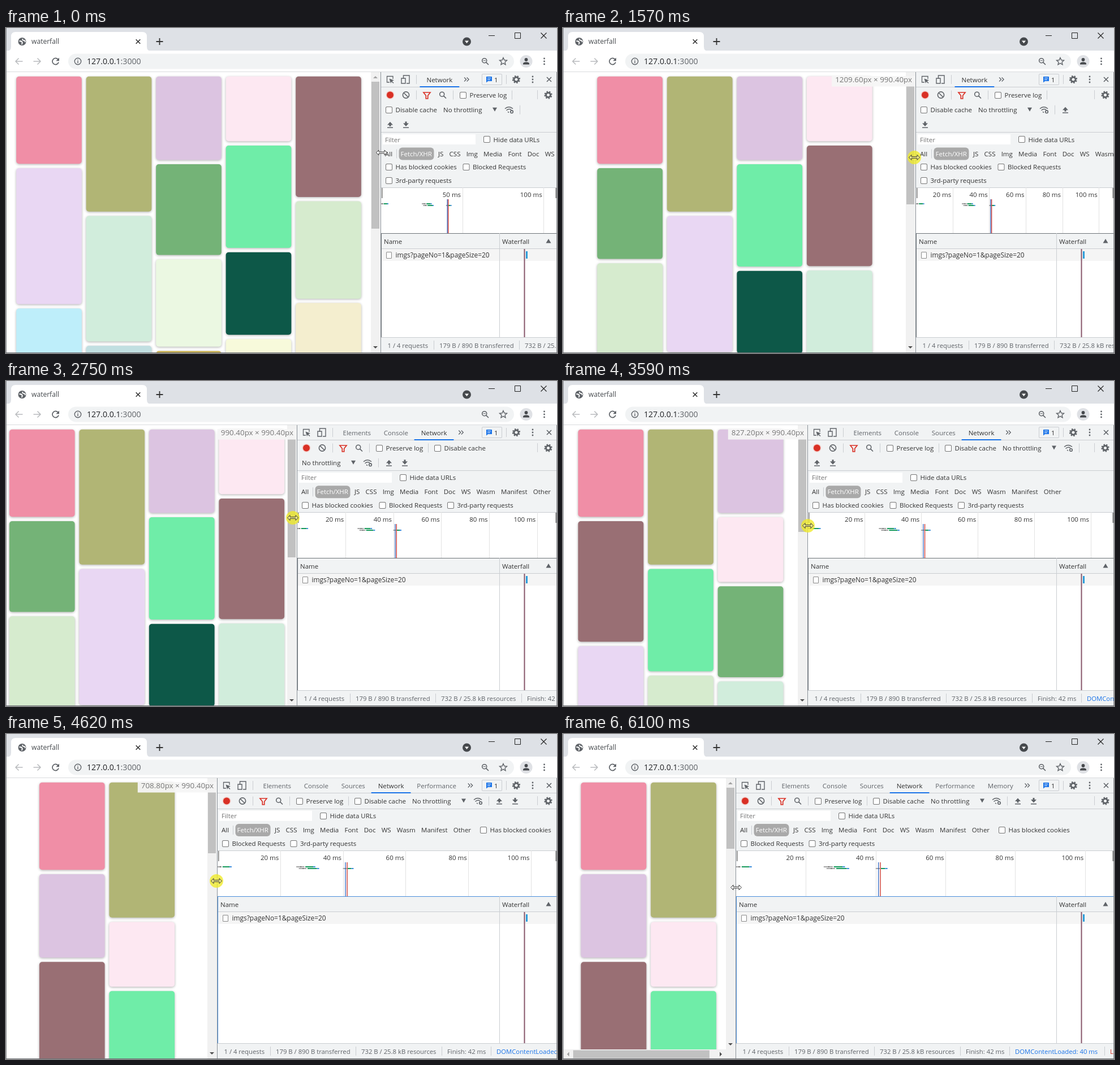
Write an HTML page with a canvas that moves like this. It is 974 px wide and 575 px high and loops after 6330 ms.

```html
<!DOCTYPE html>
<html lang="en">
<head>
<meta charset="utf-8">
<title>waterfall</title>
<style>
html, body { margin: 0; width: 100%; height: 100%; overflow: hidden; background: #fff; }
canvas { display: block; }
</style>
</head>
<body>
<canvas id="stage" width="974" height="575"></canvas>
<script>
const c = document.getElementById('stage').getContext('2d');
const W = 974, H = 575, LOOP = 6330, TICK = 78.4, DRAG_START = 923;
const INK = '#333', GREY = '#5f6368', PANEL = '#f1f3f4', RULE = '#cacdd1', BLUE = '#1a73e8', RED = '#d93025';

// [tick, splitter x, pointer offset, pointer y]
const DRAG = [
  [-1, 663, 1, 220.5], [0, 659, 0, 221], [3, 641, -1, 227], [7, 630, -2, 228], [8, 624, -3, 229],
  [13, 594, -4, 231], [17, 543, -3, 235], [18, 543, -3, 235], [23, 515, -8, 242], [24, 503, -6, 244],
  [27, 480, -3, 247], [28, 480, -3, 247], [34, 433, 0, 256], [37, 411, -1, 257], [45, 380, -2, 259],
  [47, 374, -2, 260], [54, 306, 0, 271.5]
];

const CARDS = [
  ['#f08ea6', 154.6], ['#b1b575', 239.1], ['#dcc4e1', 147.6], ['#fde8f2', 114.6], ['#996f74', 213.2],
  ['#6feda8', 181.1], ['#74b377', 160.6], ['#e9d7f3', 240.6], ['#d6ebce', 172.3], ['#d1eddc', 222],
  ['#0d5848', 146], ['#ebf8e2', 154.5], ['#f4eecf', 200], ['#beeefa', 200], ['#f7fadb', 200],
  ['#c1dfe1', 200], ['#c9b04f', 200]
];
const CARD_W = 115.7, PITCH = 123.5, GAP = 7.7, MIN_PAGE = 302.5;

function rect(x, y, w, h, fill, r = 0) {
  c.fillStyle = fill;
  c.beginPath();
  c.roundRect(x, y, w, h, r);
  c.fill();
}
function frame(x, y, w, h, color, fill, r = 0) {
  rect(x, y, w, h, color, r);
  rect(x + 1, y + 1, w - 2, h - 2, fill, Math.max(0, r - 1));
}
function dot(x, y, r, fill) { rect(x - r, y - r, 2 * r, 2 * r, fill, r); }
function vline(x, y1, y2, color = RULE) { rect(Math.round(x), y1, 1, y2 - y1, color); }
function font(size) { c.font = size + 'px "Open Sans", "Noto Sans", sans-serif'; }
function text(s, x, y, color = INK, size = 11.5) {
  font(size);
  c.fillStyle = color;
  c.fillText(s, x, y + size * 0.36);
  return c.measureText(s).width;
}
function width(s, size = 11.5) { font(size); return c.measureText(s).width; }
// Draws an SVG path around a centre point.
function icon(x, y, d, stroke, lw = 1.3, fill) {
  const p = new Path2D(d);
  c.save();
  c.translate(x, y);
  if (fill) { c.fillStyle = fill; c.fill(p); }
  if (stroke) { c.strokeStyle = stroke; c.lineWidth = lw; c.stroke(p); }
  c.restore();
}
function ring(r, x = 0, y = 0) { return `M${x - r} ${y}a${r} ${r} 0 1 0 ${2 * r} 0a${r} ${r} 0 1 0 ${-2 * r} 0`; }
function cross(x, y, r, color, lw) { icon(x, y, `M${-r} ${-r}L${r} ${r}M${r} ${-r}L${-r} ${r}`, color, lw); }
function dots(x, y) { for (const d of [-5, 0, 5]) dot(x, y + d, 1.4, GREY); }
function lens(x, y) { icon(x, y, ring(4, -1.3, -1.3) + 'M1.6 1.6L6 6', GREY, 1.6); }
function gear(x, y) {
  icon(x, y, ring(4), GREY, 2.8);
  c.setLineDash([2.4, 2.3]);
  icon(x, y, ring(6), GREY, 2.2);
  c.setLineDash([]);
}
function check(label, x, y) {
  frame(x + 6, Math.round(y - 6), 12, 12, '#767676', '#fff', 2.5);
  text(label, x + 23.5, y);
}

function browser() {
  rect(0, 0, W, 41, '#dee1e6');
  rect(0, 40, W, 38, '#fff');
  icon(0, 0, 'M1 41Q9 41 9 33V15Q9 7 17 7H241Q249 7 249 15V33Q249 41 257 41Z', null, 0, '#fff');
  dot(28.5, 24, 7, GREY);
  icon(28.5, 24, 'M-5 -1Q-1 -1 0 1T-1 5M1 -5Q0 -2 3 -2T5 1', '#fff', 1.8);
  text('waterfall', 45, 24, '#45494d', 12.1);
  cross(233.5, 24, 3.8, INK, 1.6);
  icon(271.5, 24, 'M-6 0H6M0 -6V6', INK, 1.8);
  dot(814.5, 24, 7.5, '#46494d');
  icon(814.5, 24, 'M-3.5 -1.5H3.5L0 3Z', null, 0, '#fff');
  rect(853, 13, 11, 1, '#222');
  icon(904.5, 13.5, 'M-5 -5H5V5H-5Z', '#222', 1);
  cross(950.5, 13.5, 5, '#222', 1.1);

  icon(23, 59, 'M6.5 0H-6M-.5 -5.5L-6 0L-.5 5.5', '#b9bbbe', 1.5);
  icon(55, 59, 'M-6.5 0H6M.5 -5.5L6 0L.5 5.5', '#b9bbbe', 1.5);
  icon(87.5, 59, 'M4.2 -3.8A5.6 5.6 0 1 0 5.5 1.5', GREY, 1.7);
  icon(87.5, 59, 'M6.5 -6.5V-.8H.8Z', null, 0, GREY);
  rect(110, 45.5, 788, 27, PANEL, 13.5);
  icon(127, 59, ring(5.7) + 'M0 -1V3.2M0 -3.3V-1.9', GREY, 1.4);
  const w = text('127.0.0.1', 143, 59, '#202124', 14.1);
  text(':3000', 143 + w, 59, GREY, 14.1);
  lens(847, 59);
  rect(843.5, 57.2, 4.5, 1, GREY);
  icon(879, 59, 'M0 -6.5L1.9 -2.2L6.5 -1.8L3 1.3L4 5.8L0 3.4L-4 5.8L-3 1.3L-6.5 -1.8L-1.9 -2.2Z', GREY, 1.4);
  dot(919.5, 59, 11, '#dfe1e5');
  dot(919.5, 56, 2.9, '#46494d');
  icon(919.5, 59, 'M-5.5 5.5V4Q-5 1.2 0 1.2T5.5 4V5.5Z', null, 0, '#46494d');
  dots(951.5, 59);
  rect(0, 77, W, 1, '#d9dbde');
}

function page(split) {
  const view = split - 18, full = Math.max(split - 17, MIN_PAGE), sideways = split - 17 < MIN_PAGE;
  const cols = Math.floor((full + 5.5) / PITCH);
  const left = (full - cols * PITCH + PITCH - CARD_W) / 2;
  const bottoms = Array(cols).fill(85.7);
  const bottom = sideways ? 558 : 574;

  c.save();
  c.beginPath();
  c.rect(0, 78, split, H);
  c.clip();
  rect(0, 78, split, H, '#fff');
  for (const [color, h] of CARDS) {
    const y = Math.min(...bottoms), i = bottoms.indexOf(y);
    c.shadowColor = 'rgba(0,0,0,.3)';
    c.shadowBlur = 4;
    c.shadowOffsetY = 1.2;
    rect(left + i * PITCH, y, CARD_W, h, color, 5);
    c.shadowColor = 'transparent';
    bottoms[i] = y + h + GAP;
  }

  rect(view, 78, 17, H, '#f1f1f1');
  const thumb = [116, 172, 217, 260][cols - 2] - (sideways ? 8 : 0);
  rect(split - 17, 95, 14, thumb, '#c1c1c1');
  icon(split - 10, 87, 'M-4 2L0 -2L4 2Z', null, 0, '#a3a3a3');
  icon(split - 10, bottom - 9, 'M-4 -2L0 2L4 -2Z', null, 0, '#505050');
  if (sideways) {
    rect(0, 558, split, 17, '#f1f1f1');
    rect(18, 559.5, (view - 35) * view / MIN_PAGE, 14, '#c1c1c1');
    icon(9, 566.5, 'M2 -4L-2 0L2 4Z', null, 0, '#a3a3a3');
    icon(view - 9, 566.5, 'M-2 -4L2 0L-2 4Z', null, 0, '#505050');
  }
  c.restore();
}

function sizeLabel(split) {
  const css = Math.round((2 * split - 39) / 1.6) * 1.6;
  const label = css.toFixed(2) + 'px × 990.40px';
  const w = width(label, 13.4) + 11;
  rect(split - 2 - w, 85, w, 18.5, 'rgba(246,246,246,.95)');
  text(label, split + 4 - w, 91.5, '#777', 13.4);
}

// Places [width, draw] items in rows and returns the last row's y.
function flow(items, x, y, start, limit, rowH) {
  for (const [w, draw] of items) {
    if (x + w > limit) { x = start; y += rowH; }
    draw(x, y);
    x += w;
  }
  return y;
}
const separator = [9, (x, y) => vline(x + 4, y - 8, y + 8)];
const TOOLS = [
  [28, (x, y) => { dot(x + 14, y, 7.5, '#f3cfcb'); dot(x + 14, y, 6, RED); }],
  [28, (x, y) => icon(x + 14, y, ring(5.6) + 'M-4 -4L4 4', GREY, 1.6)],
  separator,
  [28, (x, y) => icon(x + 14, y + .5, 'M-6 -5H6L1.7 .5V6H-1.7V.5Z', RED, 1.7)],
  [28, (x, y) => lens(x + 14, y)],
  [10, separator[1]],
  [94, (x, y) => check('Preserve log', x, y)],
  separator,
  [102, (x, y) => check('Disable cache', x, y)],
  [109, (x, y) => {
    text('No throttling', x + 6, y);
    icon(x + 97, y - 1, 'M-4 -3H4L0 4Z', null, 0, GREY);
  }],
  [28, (x, y) => {
    icon(x + 13, y, 'M-7 -2Q0 -8 7 -2M-4.5 1Q0 -3 4 0M-2 3.5L0 5', GREY, 1.5);
    icon(x + 18, y + 3.5, ring(2.3), GREY, 1.6);
  }],
  separator,
  [28, (x, y) => icon(x + 14, y, 'M0 -5L5 .5H1.5V3H-1.5V.5H-5ZM-5 4.5H5V6H-5Z', null, 0, GREY)],
  [28, (x, y) => icon(x + 14, y, 'M0 3L5 -2.5H1.5V-5.5H-1.5V-2.5H-5ZM-5 4.5H5V6H-5Z', null, 0, GREY)]
];
const CHECKS = [
  [136.5, (x, y) => check('Has blocked cookies', x, y)],
  [120.5, (x, y) => check('Blocked Requests', x, y)],
  [123, (x, y) => check('3rd-party requests', x, y)]
];

function tabs(split) {
  icon(split + 16, 91, 'M-1 5H-5.5V-5.5H5V-1', GREY, 1.3);
  icon(split + 16, 91, 'M-1.5 -1.5L7 1.5L3.5 3L6.5 6L5.5 7L2.5 4L1 7Z', null, 0, GREY);
  icon(split + 43, 91, 'M-3.5 -1V-7H7V7H2M-7 -2H0V7H-7Z', GREY, 1.4);
  vline(split + 62, 83, 99);

  const names = ['Elements', 'Console', 'Sources', 'Network', 'Performance', 'Memory'], space = 22.8;
  let shown = ['Network'], end = split + 80 + width('Network');
  for (const name of names) {
    if (name === 'Network') continue;
    end += width(name) + space;
    if (end > 803) break;
    shown.push(name);
  }
  let x = split + 80.5;
  for (const name of names.filter(n => shown.includes(n))) {
    const active = name === 'Network';
    const w = text(name, x, 91.5, active ? INK : GREY);
    if (active) rect(x - 12, 103, w + 24, 2, BLUE);
    x += w + space;
  }
  icon(x + 2, 91, 'M-4 -3.5L-.5 0L-4 3.5M.5 -3.5L4 0L.5 3.5', GREY, 1.3);

  frame(841, 81, 36, 20, RULE, PANEL, 2);
  icon(854, 91, 'M-5 -5H5V3H-2L-5 5.5Z', null, 0, BLUE);
  icon(854, 91, 'M-3 -2.5H3M-3 .5H2', '#fff', 1);
  text('1', 863, 91.5);
  vline(884, 83, 99);
  gear(902, 91);
  dots(931, 91);
  cross(960, 91, 4, GREY, 1.6);
}

function typeRow(split, y) {
  text('All', split + 7, y);
  vline(split + 27, y - 8, y + 8);
  rect(split + 31.5, y - 11, 62, 22, '#a9a9a9', 6);
  text('Fetch/XHR', split + 34.5, y, '#fff');
  let x = split + 101;
  for (const name of ['JS', 'CSS', 'Img', 'Media', 'Font', 'Doc', 'WS', 'Wasm', 'Manifest', 'Other'])
    x += text(name, x, y) + 10.2;
}

function timeline(split, top) {
  const scale = (W - split) / 108.3, at = ms => split + ms * scale;
  const step = scale * 20 < 64 ? 50 : 20;
  rect(split, top, W, 81, '#fff');
  rect(split, top, W, 1, RULE);
  for (let ms = step; ms <= 100; ms += step) {
    const label = ms + ' ms';
    vline(at(ms), top, top + 81, '#e2e2e2');
    text(label, at(ms) - 2.5 - width(label), top + 13);
  }
  // Start, end of waiting, end of download, row
  for (const [a, b, d, row] of [[0, 1.6, 3.8, 0], [25.1, 28, 30.5, 0], [25.9, 28.7, 31.7, 1], [40, 41.5, 42.7, 1]]) {
    const y = top + 28 + row * 3;
    rect(at(a), y, (b - a - .3) * scale, 2, '#a5a5a5');
    rect(at(a + (b - a) * .45), y, Math.max(1, .3 * scale), 2, '#666');
    rect(at(b), y, (d - b) * scale, 2, '#15995a');
    rect(at(d), y, .7 * scale, 2, '#3b8edb');
  }
  rect(at(40.8) - .7, top + 21, 1.4, 60, '#4272c4');
  rect(at(41.35) - .7, top + 21, 1.4, 60, '#cf4038');
  rect(split + 1, top + 1, 1.5, 18, '#777');
  rect(971.5, top + 1, 1.5, 18, '#777');
}

function requests(split, top) {
  const focused = split < 400 || (split > 560 && split < 620);
  const edge = focused ? '#4a8edb' : '#6e7479';
  rect(split, top, W, 548 - top, '#fff');
  rect(split, top, W, 28, PANEL);
  rect(split, top + 27, W, 1, RULE);
  rect(split, top + 28, W, 21, '#f5f5f5');
  rect(split, top, W, 1, edge);
  text('Name', split + 5, top + 14.5);
  text('Waterfall', 877, top + 14.5);
  icon(959, top + 14, 'M-4.5 3.5H4.5L0 -4Z', null, 0, GREY);
  frame(split + 9, Math.round(top + 33), 10, 12, '#8a8a8a', '#fff', 1.5);
  text('imgs?pageNo=1&pageSize=20', split + 25.5, top + 38.5, INK, 11.9);
  vline(872, top, 547);
  rect(919, top + 32, 3, 13, '#2b9bd8');
  rect(915.5, top + 28, 2, 519 - top, '#87566b');
  return edge;
}

function statusBar(split) {
  rect(split, 547, W, 28, PANEL);
  rect(split, 547, W, 1, RULE);
  [
    ['1 / 4 requests', 11.5], ['179 B / 890 B transferred', 103], ['732 B / 25.8 kB resources', 254],
    ['Finish: 42 ms', 406], ['DOMContentLoaded: 40 ms', 493, BLUE], ['Load: 41 ms', 661, RED]
  ].forEach(([s, x, color = GREY], i) => {
    if (i) vline(split + x - 10, 553, 569);
    text(s, split + x, 561.5, color, 11.3);
  });
}

function devtools(split) {
  c.save();
  c.beginPath();
  c.rect(split - 1, 78, W - split, H);
  c.clip();
  rect(split, 78, W, H, PANEL);
  rect(split, 104, W, 1, RULE);
  tabs(split);

  const start = split + 2;
  const toolY = flow(TOOLS, start, 118.5, start, 925, 26.2);
  vline(939, 110, 126);
  gear(958.5, 118.5);
  rect(split, Math.round(toolY + 13.5), W, 1, RULE);

  const filterY = toolY + 26.2;
  rect(split + 3, filterY - 9, 164, 18, '#fff');
  text('Filter', split + 7, filterY + .3, '#757575');
  check('Hide data URLs', split + 175, filterY + .3);
  typeRow(split, filterY + 25.3);
  const checkY = flow(CHECKS, split + 458, filterY + 25.3, start, 970, 23.7);

  const top = Math.round(checkY + 12);
  timeline(split, top);
  const edge = requests(split, top + 81);
  statusBar(split);
  rect(split - 1, 78, 1, H, '#8b9299');
  rect(split, top + 81, 1, 466 - top, edge);
  c.restore();
}

function pointer(x, y, pressed) {
  if (pressed) dot(x, y, 12, 'rgba(240,234,40,.78)');
  icon(x, y, 'M-9.5 0L-5 -4.5V-1.3H5V-4.5L9.5 0L5 4.5V1.3H-5V4.5Z', '#333', 1, pressed ? '#f4ee8a' : '#fff');
}

function pose(t) {
  const k = Math.max(-1, Math.min(54, Math.floor((t - DRAG_START) / TICK)));
  const i = Math.max(1, DRAG.findIndex(p => p[0] >= k));
  const a = DRAG[i - 1], b = DRAG[i], f = (k - a[0]) / (b[0] - a[0]);
  const [, split, dx, y] = a.map((v, j) => v + (b[j] - v) * f);
  return { k, split: Math.round(split), x: Math.round(split + dx), y };
}

function draw(now) {
  const t = now % LOOP, { k, split, x, y } = pose(t);
  browser();
  page(split);
  if (k >= 0 && t < 6100) sizeLabel(split);
  devtools(split);
  pointer(x, y, t >= 700 && t < 5950);
  rect(0, 0, 1, H, '#8a8d91');
  rect(W - 1, 78, 1, H, '#8a8d91');
  rect(0, H - 1, W, 1, '#6f7276');
  requestAnimationFrame(draw);
}
requestAnimationFrame(draw);
</script>
</body>
</html>
```
